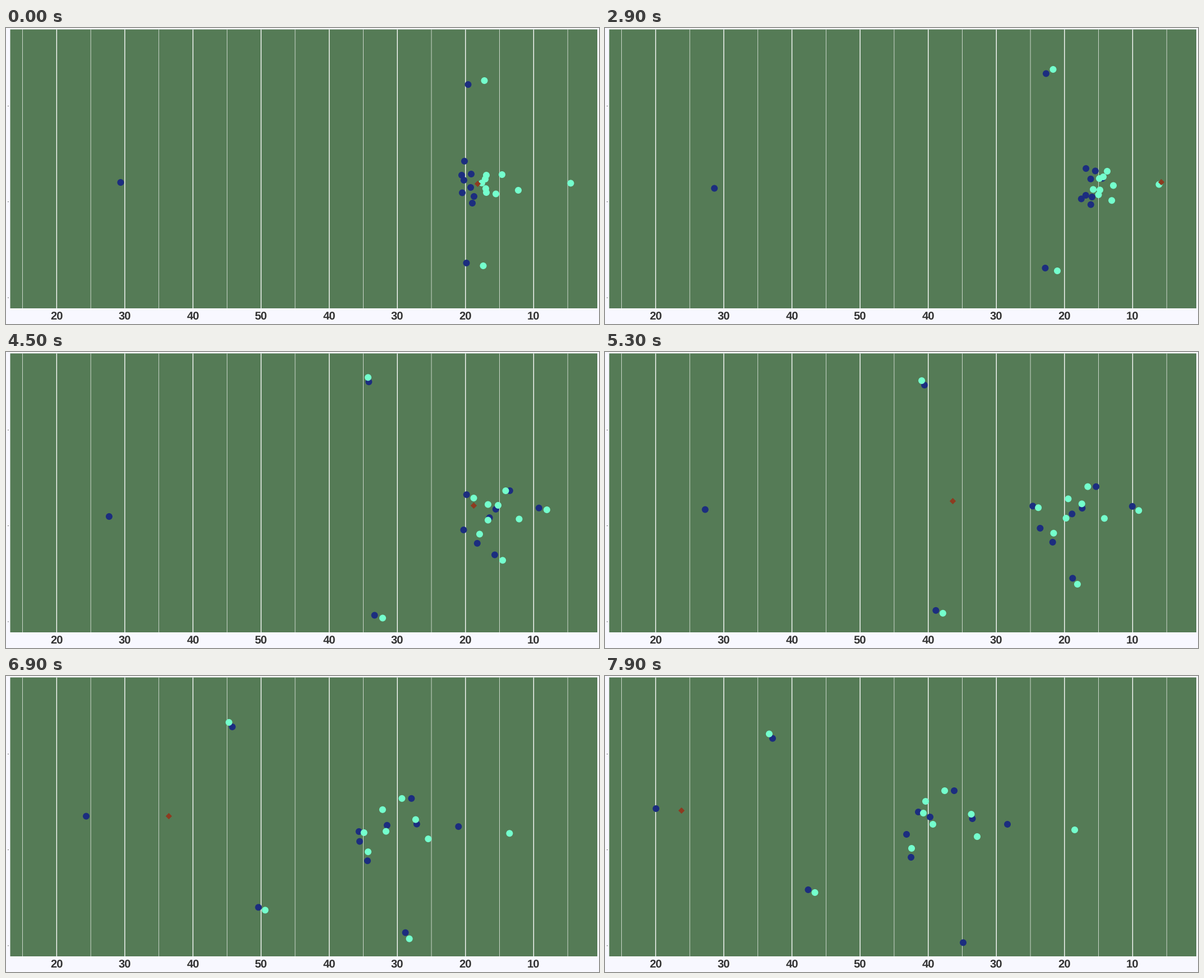
Animation, 1058 px wide and 529 px high, one loop 8000 ms. Source, as a matplotlib script:

```python
import numpy as np
import matplotlib.pyplot as plt
from matplotlib.animation import FuncAnimation

W, H, DPI = 1058, 529, 100
FRAMES, INTERVAL = 80, 100
PX = 72 / DPI                      # one pixel in points
SNAP, KICK = 15, 40.5              # key moments, in frames
SIDELINE = 482                     # players past this line are dropped

GREEN, PAPER, INK = "#557b56", "#f8f8ff", "#333333"
NAVY, MINT, BROWN = "#1c2d7f", "#74ffcd", "#8e3b20"

STEPS = np.arange(FRAMES)
RUSH = (SNAP, 29, 45, 79)          # line up, engage, release, chase
DRIFT = (SNAP, 45, 61, 79)
WEAVE = (SNAP, 29, 45, 61, 79)


def smooth(t, ts, vs):
    """Monotone cubic through the points (ts, vs)."""
    ts, vs = np.asarray(ts, float), np.asarray(vs, float)
    h = np.diff(ts)
    d = np.diff(vs) / h
    m = np.concatenate([d[:1], np.zeros(len(d) - 1), d[-1:]])
    for i in range(1, len(d)):
        a, b = d[i - 1], d[i]
        if a * b > 0:
            w1, w2 = 2 * h[i] + h[i - 1], h[i] + 2 * h[i - 1]
            m[i] = (w1 + w2) / (w1 / a + w2 / b)
    k = np.clip(np.searchsorted(ts, t, side="right") - 1, 0, len(h) - 1)
    u = (t - ts[k]) / h[k]
    v = 1 - u
    return (vs[k] * (1 + 2 * u) * v * v + vs[k + 1] * u * u * (3 - 2 * u)
            + h[k] * u * v * (m[k] * v - m[k + 1] * u))


leaders, followers = [], []


def run(color, *points, keys=RUSH):
    """Stand still until the snap, then run through the points."""
    t = np.maximum(STEPS, SNAP)
    track = np.column_stack([smooth(t, keys, vs) for vs in zip(*points)])
    leaders.append((color, track))
    return track


def mark(color, man, gap, close):
    """Stay with a man while the gap to him eases into a closer one."""
    u = np.clip((STEPS - SNAP) / 45, 0, 1)[:, None]
    ease = np.sin(u * np.pi / 2)
    followers.append((color, man + (1 - ease) * np.array(gap) + ease * np.array(close)))


# deep men: punter and returner
run(MINT, (1007.5, 277.4), (965, 282), (935, 284), (838, 275), keys=DRIFT)
run(NAVY, (204.5, 276), (184, 294), (171, 262.5), (91, 237), keys=DRIFT)

# each pair: a runner and the opponent who marks him
man = run(MINT, (853.5, 94), (799.5, 74), (646, 45.5), (293, 103.5))
mark(NAVY, man, (-29, 7), (6, 8))
man = run(MINT, (851.5, 425), (807, 434), (672, 475.5), (374.5, 387))
mark(NAVY, man, (-30, -5), (-12, -5))
man = run(MINT, (914, 290), (907, 281.5), (915.5, 298.5), (664, 287))
mark(NAVY, man, (-85, -5), (54, -22))
man = run(MINT, (885, 262), (896, 256), (891.5, 248), (606, 205))
mark(NAVY, man, (-55, -1), (17, 0))
man = run(MINT, (857, 263), (889, 266), (878, 274), (653.5, 247))
mark(NAVY, man, (-44, 0), (2, 8))
man = run(MINT, (855, 270), (882, 269), (834.5, 261), (698, 295.5), (568, 245),
          keys=WEAVE)
mark(NAVY, man, (-37, -32), (-9, -2))
man = run(MINT, (849, 277), (871, 288.5), (860, 272.5), (572, 224))
mark(NAVY, man, (-32, -5), (8, 28))
man = run(MINT, (856, 287), (883, 289.5), (860, 300.5), (585, 265))
mark(NAVY, man, (-21, 14), (-47, 18))
man = run(MINT, (857, 294), (880.5, 298), (845, 325.5), (547, 308))
mark(NAVY, man, (-25, 19), (-1, 16))
man = run(NAVY, (814, 294.5), (869, 302), (872, 362.5), (769.5, 440.5), (639, 476.5),
          keys=WEAVE)
mark(MINT, man, (60, 2), (7, 11))


def ball_at(n):
    """Snapped to the punter, held, then kicked and slowed by drag."""
    if n < KICK:
        times = (SNAP, 23, 40)
        return (np.interp(n, times, (840.5, 1003, 972)),
                np.interp(n, times, (278, 274, 278)))
    t = n - KICK
    return 972 - 1464 * (1 - np.exp(-0.022 * t)), 278 - t


players = followers + leaders
tracks = np.array([track for _, track in players])
tracks[tracks[..., 1] > SIDELINE] = np.nan

plt.rcParams["text.hinting"] = "none"
fig = plt.figure(figsize=(W / DPI, H / DPI), dpi=DPI, facecolor=PAPER)
ax = fig.add_axes([0, 0, 1, 1])
ax.set_xlim(0, W)
ax.set_ylim(H, 0)
ax.axis("off")

LEFT, RIGHT, TOP, BOTTOM = 7.5, 1055, 2.5, 501
ax.add_patch(plt.Rectangle((LEFT, TOP), RIGHT - LEFT, BOTTOM - TOP,
                           color=GREEN, lw=0, snap=False))


def line(x0, y0, x1, y1, color, width):
    ax.plot([x0, x1], [y0, y1], color=color, lw=width * PX,
            solid_capstyle="butt", snap=False, zorder=2)


TEN_YARDS = 121.57
for i in range(9):
    x = 29.6 + i * TEN_YARDS
    line(x, TOP, x, BOTTOM, "white", 0.7)
for i in range(8):
    x = 90.4 + i * TEN_YARDS
    line(x, TOP, x, BOTTOM, "white", 1.4)
    ax.text(x, 522, str(50 - 10 * abs(3 - i)), ha="center", va="baseline",
            color=INK, family="Liberation Sans", weight="bold", size=20.3 * PX)
for y in (139.5, 310.7, 482):
    line(3, y, 5, y, INK, 0.7)

dots = ax.scatter(*tracks[:, 0].T, s=(12 * PX) ** 2, c=[c for c, _ in players],
                  linewidths=0, zorder=3)
ball = ax.scatter(*ball_at(0), s=(8 * PX) ** 2, c=BROWN, marker="D",
                  linewidths=0, zorder=4)


def draw(n):
    dots.set_offsets(tracks[:, n])
    ball.set_offsets([ball_at(n)])
    return dots, ball


anim = FuncAnimation(fig, draw, frames=FRAMES, interval=INTERVAL,
                     repeat=True, repeat_delay=0)
plt.show()
```
